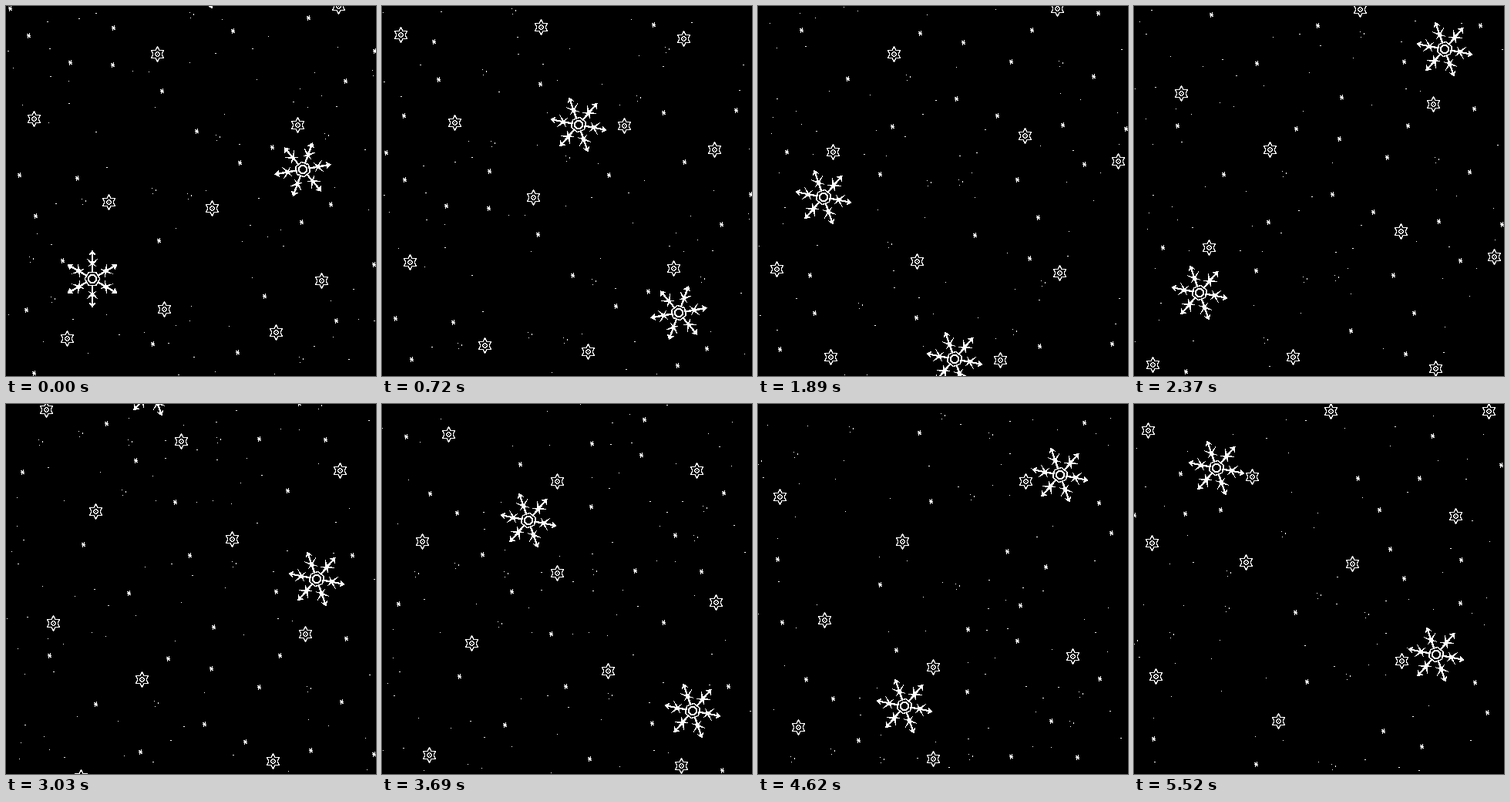
An HTML page with a canvas that plays this animation: 480 by 480 pixels, repeating every 5.55 s.

```html
<!DOCTYPE html>
<html lang="en">
<head>
<meta charset="utf-8">
<title>Snowfall</title>
<style>
html, body { margin: 0; width: 100%; height: 100%; overflow: hidden; background: #000; }
canvas { display: block; width: 480px; height: 480px; }
</style>
</head>
<body>
<canvas id="stage" width="480" height="480"></canvas>
<script>
const SIZE = 480, STEP = 30, STEPS = 185, FALL = 7.77;
const SPAN = SIZE + STEPS * FALL;
const ctx = document.getElementById('stage').getContext('2d');

let seed = 7;
function random() {
  seed = (seed * 16807) % 2147483647;
  return seed / 2147483647;
}

// Draw a flake once and reduce it to hard white pixels.
function sprite(size, draw, turn = 0) {
  const c = document.createElement('canvas');
  c.width = c.height = size;
  const g = c.getContext('2d');
  g.translate(size / 2, size / 2);
  g.rotate(turn * Math.PI / 180);
  g.fillStyle = g.strokeStyle = '#fff';
  draw(g);
  const img = g.getImageData(0, 0, size, size), d = img.data;
  for (let i = 0; i < d.length; i += 4) {
    d[i + 3] = d[i + 3] > 110 ? 255 : 0;
    d[i] = d[i + 1] = d[i + 2] = 255;
  }
  g.putImageData(img, 0, 0);
  return c;
}

function sixfold(g, arm) {
  for (let i = 0; i < 6; i++) {
    arm();
    g.rotate(Math.PI / 3);
  }
}

function poly(g, ...p) {
  g.beginPath();
  for (let i = 0; i < p.length; i += 2) g.lineTo(p[i], p[i + 1]);
  g.closePath();
  g.fill();
}

function line(g, width, x1, y1, x2, y2) {
  g.lineWidth = width;
  g.beginPath();
  g.moveTo(x1, y1);
  g.lineTo(x2, y2);
  g.stroke();
}

function ring(g, r, width) {
  g.lineWidth = width;
  g.beginPath();
  g.arc(0, 0, r, 0, 7);
  g.stroke();
}

function bigFlake(g) {
  sixfold(g, () => {
    line(g, 2.2, 0, -8, 0, -34);
    poly(g, 0, -37.5, 5, -30.5, 0, -32.5, -5, -30.5);
    for (const side of [-1, 1]) {
      poly(g, 0, -17.5, side * 9, -27.5, 0, -21.5);
      poly(g, 0, -21.5, side * 7.5, -14.5, 0, -18.5);
    }
    line(g, 1.4, -5, -8.5, 5, -8.5);
  });
  ring(g, 5.2, 2);
}

function midFlake(g) {
  sixfold(g, () => {
    line(g, 1.1, 0, -9, 2.8, -4.8);
    line(g, 1.1, 0, -9, -2.8, -4.8);
    poly(g, -1, -10, 1, -10, 1, -8, -1, -8);
  });
  ring(g, 2.8, 1.1);
  g.fillRect(-.5, -.5, 1, 1);
}

function starFlake(g) {
  sixfold(g, () => poly(g, -.8, 0, 0, -5.2, .8, 0));
  g.beginPath();
  g.arc(0, 0, 1.6, 0, 7);
  g.fill();
}

const big = turn => sprite(78, bigFlake, turn);
const mid = sprite(21, midFlake);
const star = sprite(11, starFlake, 20);
const speck = sprite(2, g => g.fillRect(0, 0, 1, 1));
const dash = sprite(2, g => g.fillRect(-1, 0, 2, 1));
const cluster = sprite(12, g => {
  for (let i = 0; i < 4; i++) g.fillRect(Math.round(3 * Math.cos(2 * i)), Math.round(4 * Math.sin(2 * i)), 1, 1);
});

const sky = [];
const add = (img, x, y) => sky.push({ img, x, y });

// The flakes that lead the composition; y is the height at the first step.
const upright = big(0), right = big(20), left = big(-19);
add(upright, 112, 354);
add(right, 385, 212);
for (const [x, y] of [[255, -32], [85, -242], [403, -558], [190, -805], [392, -1105], [107, -1347]])
  add(left, x, y);

const medium = [
  [79, 431], [350, 423], [205, 393], [409, 356], [267, 262], [133, 254], [378, 154],
  [36, 146], [196, 62], [431, 0], [314, -31], [94, -35], [391, -144], [24, -149],
  [206, -159], [467, -289], [97, -301], [346, -322], [176, -428], [388, -487],
  [61, -501], [293, -610], [116, -646], [433, -699], [227, -737], [52, -778],
  [227, -856], [408, -870], [86, -917], [187, -1019], [28, -1077], [347, -1097],
  [283, -1223], [145, -1225], [23, -1250], [417, -1285], [153, -1336], [18, -1396],
  [255, -1421], [460, -1421]
];
for (const [x, y] of medium) add(mid, x + .5, y + .5);

// Sprinkle flakes at random, keeping a clear gap around each one.
function scatter(img, count, gap) {
  for (let tries = 0; count > 0 && tries < 5000; tries++) {
    const x = random() * SIZE, y = SIZE - random() * SPAN;
    if (sky.every(f => Math.hypot(f.x - x, f.y - y) > Math.max(gap, f.img.width / 2))) {
      add(img, x, y);
      count--;
    }
  }
}
scatter(star, 97, 42);
scatter(cluster, 36, 24);
scatter(dash, 110, 20);
scatter(speck, 170, 18);

function paint(step) {
  ctx.fillStyle = '#000';
  ctx.fillRect(0, 0, SIZE, SIZE);
  for (const { img, x, y } of sky) {
    const half = img.width / 2, top = Math.round(y + step * FALL - half);
    if (top < SIZE && top + img.height > 0) ctx.drawImage(img, Math.round(x - half), top);
  }
}

const start = performance.now();
function tick() {
  paint(Math.floor((performance.now() - start) / STEP) % STEPS);
  requestAnimationFrame(tick);
}
tick();
</script>
</body>
</html>
```
